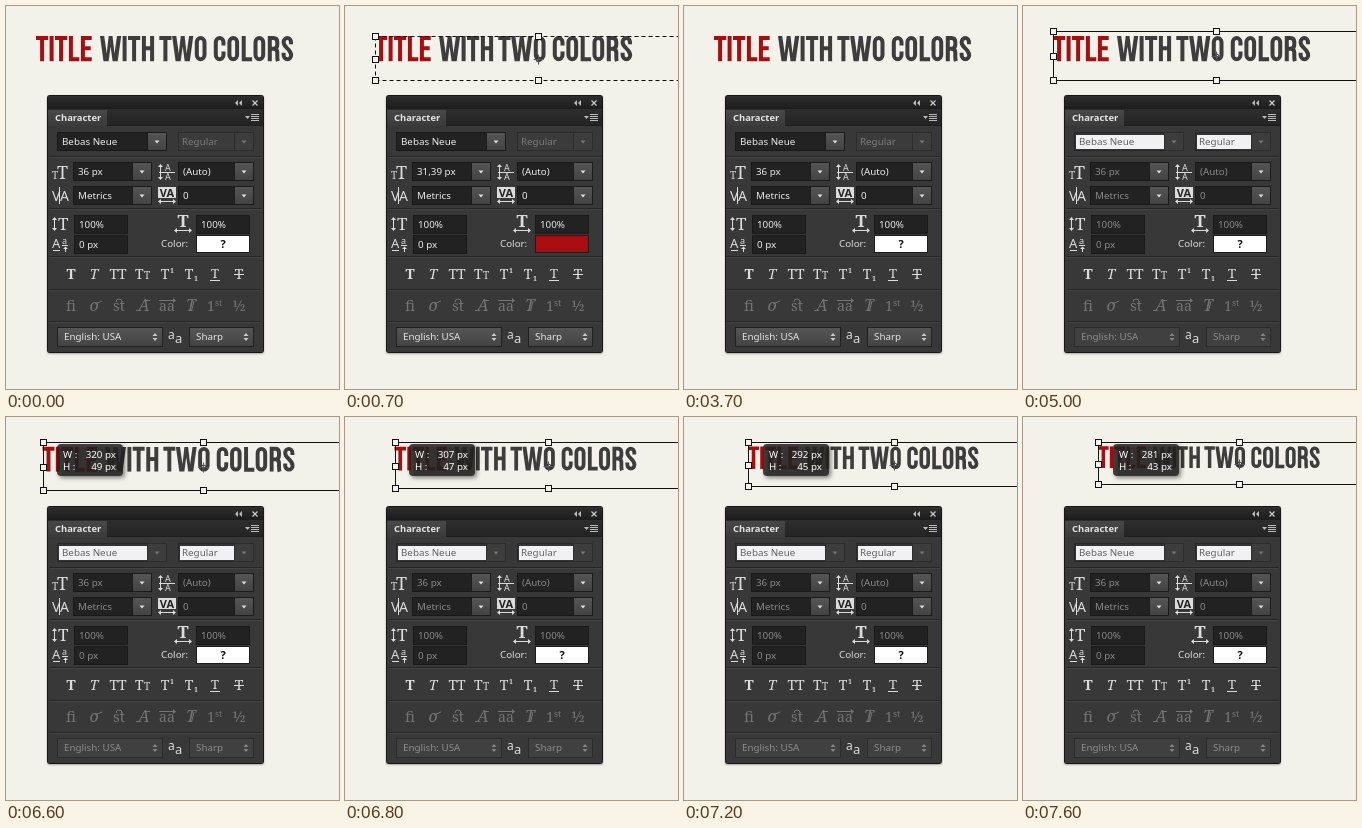
Animation, 333 px wide and 383 px high, one loop 8000 ms. Source, as an HTML page with a canvas:

```html
<!DOCTYPE html>
<html lang="en">
<head>
<meta charset="utf-8">
<title>Title with two colors</title>
<style>
  html, body { margin: 0; width: 100%; height: 100%; overflow: hidden; background: #f2f1ea; }
  canvas { display: block; }
</style>
</head>
<body>
<canvas id="stage" width="333" height="383" role="img" aria-label="TITLE WITH TWO COLORS, above a Character panel"></canvas>
<script>
const W = 333, H = 383, LOOP = 8000;
const RED = '#a80d10', GREY = '#3d3d3d', LIGHT = '#dcdcdc', DIM = '#7c7c7c';
const SANS = '"Noto Sans", "Open Sans", sans-serif';
const SERIF = '"Noto Serif", "Liberation Serif", serif';
const UI = '500 9.8px ' + SANS;

const main = document.getElementById('stage').getContext('2d');
const buffer = document.createElement('canvas');
buffer.width = W;
buffer.height = H;
const layer = buffer.getContext('2d');
let c = main;

// Condensed capitals, 25.2 units high: advance and path
const glyphs = {
  T: [12.8, 'M.3 1.9H12.5M6.4 0V25.2'],
  I: [6.2, 'M3.1 0V25.2'],
  L: [12, 'M3.4 0V23.3H11.8'],
  E: [13.4, 'M12.2 1.9H3.4V23.3H12.2M3.4 12.3H11.2'],
  W: [21.8, 'M.3 0H4.5L7 17.6 9 0H12.8L14.8 17.6 17.3 0H21.5L18 25.2H12.9L10.9 10.5 8.9 25.2H3.8Z'],
  H: [15, 'M3.4 0V25.2M11.6 0V25.2M3.4 12.3H11.6'],
  O: [14.1, 'M3.2 6.2a3.85 4.2 0 0 1 7.7 0V19a3.85 4.2 0 0 1-7.7 0Z'],
  C: [13.6, 'M10.9 9.4V6.2a3.85 4.2 0 0 0-7.7 0V19a3.85 4.2 0 0 0 7.7 0V15.6'],
  R: [14.3, 'M3.4 25.2V1.9H7Q10.9 1.9 10.9 6V8.8Q10.9 12.7 7 12.7H3.4M7.4 12.7Q10.9 13 10.9 16.5V21Q10.9 23.5 11.5 25.2'],
  S: [13.4, 'M10.3 8.2V6.2a3.7 4.2 0 0 0-7.4 0Q2.9 9 6.6 12.4T10.5 19a3.8 4.2 0 0 1-7.6 0V16.8']
};
for (const k in glyphs) glyphs[k][1] = new Path2D(glyphs[k][1]);

function word(s, x, color) {
  c.fillStyle = c.strokeStyle = color;
  c.lineWidth = 4;
  for (const ch of s) {
    const [advance, path] = glyphs[ch];
    c.save();
    c.translate(x, 30);
    ch === 'W' ? c.fill(path) : c.stroke(path);
    c.restore();
    x += advance;
  }
}

function text(s, x, y, color = LIGHT, font = UI, align = 'left') {
  c.font = font;
  c.fillStyle = color;
  c.textAlign = align;
  c.fillText(s, x, y);
}

function rect(x, y, w, h, color) {
  c.fillStyle = color;
  c.fillRect(x, y, w, h);
}

function frame(x, y, w, h, fill, edge) {
  rect(x, y, w, h, edge);
  rect(x + 1, y + 1, w - 2, h - 2, fill);
}

function poly(color, ...p) {
  c.fillStyle = color;
  c.beginPath();
  for (let i = 0; i < p.length; i += 2) c.lineTo(p[i], p[i + 1]);
  c.fill();
}

function line(x1, y1, x2, y2, color = LIGHT, width = 1) {
  c.strokeStyle = color;
  c.lineWidth = width;
  c.beginPath();
  c.moveTo(x1, y1);
  c.lineTo(x2, y2);
  c.stroke();
}

// Arrow with a head at both ends
function arrow(x1, y1, x2, y2) {
  line(x1, y1, x2, y2);
  for (const [x, y, d] of [[x1, y1, -1], [x2, y2, 1]]) {
    if (x1 === x2) poly(LIGHT, x - 2.5, y - d * 2, x + 2.5, y - d * 2, x, y + d);
    else poly(LIGHT, x - d * 2, y - 2.5, x - d * 2, y + 2.5, x + d, y);
  }
}

function gradient(y, h, top, bottom) {
  const g = c.createLinearGradient(0, y, 0, y + h);
  g.addColorStop(0, top);
  g.addColorStop(1, bottom);
  return g;
}

function field(s, x, y, w, dim) {
  frame(x, y, w, 19, '#222', '#191919');
  text(s, x + 5, y + 13, dim ? '#8a8a8a' : '#ececec');
}

function dropButton(x, y, off) {
  frame(x, y, 20, 19, off ? '#3d3d3d' : gradient(y, 19, '#565656', '#424242'), off ? '#2d2d2d' : '#1b1b1b');
  poly(off ? '#777' : '#ddd', x + 7.5, y + 8.5, x + 12.5, y + 8.5, x + 10, y + 11.5);
}

function combo(s, x, y, w, dim) {
  field(s, x, y, w, dim);
  dropButton(x + w - 1, y);
}

function select(s, x, w, dim) {
  const mark = dim ? '#858585' : '#c8c8c8', m = x + w - 8;
  frame(x, 321, w, 20, dim ? '#404040' : gradient(321, 20, '#565656', '#434343'), dim ? '#2c2c2c' : '#202020');
  text(s, x + 7, 334, dim ? '#8c8c8c' : '#e6e6e6');
  poly(mark, m - 2.5, 330, m + 2.5, 330, m, 327);
  poly(mark, m - 2.5, 332, m + 2.5, 332, m, 335);
}

function divider(y) {
  rect(43, y, 213, 1, '#262626');
  rect(43, y + 1, 213, 1, '#444');
}

function icons() {
  const serif = (n, w = '500') => `${w} ${n}px ${SERIF}`;
  text('T', 46, 173, LIGHT, serif(10));
  text('T', 51, 173, LIGHT, serif(18));
  arrow(154.5, 159, 154.5, 173);
  text('A', 159, 165, LIGHT, '500 9px ' + SANS);
  text('A', 159, 174, LIGHT, '500 9px ' + SANS);
  line(153, 166.5, 169, 166.5);

  text('V', 46, 195, LIGHT, '500 14px ' + SANS);
  text('A', 54, 195, LIGHT, '500 14px ' + SANS);
  line(53.5, 181, 53.5, 198);
  rect(152, 181, 18, 11, LIGHT);
  text('VA', 161, 191, '#222', 'bold 11px ' + SANS, 'center');
  arrow(153, 195.5, 169, 195.5);

  arrow(48.5, 212, 48.5, 224);
  text('T', 52, 224, LIGHT, serif(17));
  text('T', 177, 221, LIGHT, serif(17, 'bold'), 'center');
  arrow(169, 224.5, 185, 224.5);
  text('A', 46, 242, LIGHT, '500 13px ' + SANS);
  text('a', 56, 238, LIGHT, '500 9px ' + SANS);
  line(47, 244.5, 54, 244.5);
  line(56, 239.5, 62, 239.5);
  line(59.5, 241, 59.5, 246);
  poly(LIGHT, 57, 243, 62, 243, 59.5, 240.5);

  text('T', 65, 273, LIGHT, serif(14, 'bold'), 'center');
  text('T', 88, 273, LIGHT, serif(14, 'italic'), 'center');
  text('TT', 112, 273, LIGHT, serif(14), 'center');
  text('T', 129, 273, LIGHT, serif(14));
  text('T', 138, 273, LIGHT, serif(10));
  text('T', 159, 273, LIGHT, serif(14), 'center');
  text('1', 164, 267, LIGHT, serif(7, 'bold'));
  text('T', 183, 273, LIGHT, serif(14), 'center');
  text('1', 188, 275, LIGHT, serif(7, 'bold'));
  text('T', 209, 272, LIGHT, serif(13), 'center');
  line(204, 274.5, 214, 274.5);
  text('T', 233, 273, LIGHT, serif(14), 'center');
  line(228, 268.5, 238, 268.5);

  const off = '#747474', plain = serif(15), slant = serif(16, 'italic');
  text('fi', 65, 305, off, plain, 'center');
  text('o', 88, 305, off, slant, 'center');
  line(89, 298, 96, 295, off);
  text('st', 113, 305, off, plain, 'center');
  c.beginPath();
  c.arc(113, 296, 3, Math.PI, 0);
  c.stroke();
  text('A', 138, 305, off, slant, 'center');
  line(130, 304.5, 134, 304.5, off);
  line(138, 294.5, 144, 294.5, off);
  text('aa', 161, 305, off, serif(14), 'center');
  line(153, 294.5, 168, 294.5, off);
  poly(off, 167, 292, 170, 294.5, 167, 297);
  text('T', 185, 305, off, slant, 'center');
  line(185.5, 305, 188, 295, off);
  text('1', 201, 305, off, serif(14));
  text('st', 209, 300, off, serif(9));
  text('½', 233, 305, off, serif(15), 'center');

  text('a', 162, 333, LIGHT, '500 12px ' + SANS);
  text('a', 169, 337, LIGHT, '500 13px ' + SANS);
}

function panel(s) {
  const dim = s.left !== undefined;
  c.save();
  c.shadowColor = 'rgba(0,0,0,.3)';
  c.shadowBlur = 2;
  c.shadowOffsetY = 1;
  c.fillStyle = '#171717';
  c.beginPath();
  c.roundRect(41, 89, 217, 258, 3);
  c.fill();
  c.restore();

  rect(42, 90, 215, 13, gradient(90, 13, '#2e2e2e', '#1c1c1c'));
  rect(42, 103, 215, 17, gradient(103, 17, '#2d2d2d', '#242424'));
  rect(42, 104, 59, 17, gradient(104, 17, '#484848', '#3a3a3a'));
  rect(42, 120, 215, 226, '#383838');
  rect(101, 119, 156, 1, '#1e1e1e');
  text('Character', 49, 115, '#e4e4e4', '600 9.4px ' + SANS);
  poly('#bbb', 232, 94, 232, 100, 229, 97);
  poly('#bbb', 236, 94, 236, 100, 233, 97);
  line(246.5, 94.5, 251.5, 99.5, '#c8c8c8', 1.3);
  line(251.5, 94.5, 246.5, 99.5, '#c8c8c8', 1.3);
  poly('#bbb', 239, 110, 244, 110, 241.5, 113);
  for (let i = 0; i < 4; i++) rect(245, 108 + 2 * i, 8, 1, '#bbb');

  if (dim) {
    frame(51, 126, 91, 19, '#333', '#282828');
    rect(53, 129, 88, 14, '#f1f0f3');
    frame(172, 126, 57, 19, '#333', '#282828');
    rect(174, 129, 54, 14, '#f1f0f3');
    text('Bebas Neue', 56, 139, '#626262');
    text('Regular', 176, 139, '#626262');
  } else {
    field('Bebas Neue', 51, 126, 91);
    frame(172, 126, 57, 19, '#3b3b3b', '#2c2c2c');
    text('Regular', 176, 139, DIM);
  }
  dropButton(141, 126, dim);
  dropButton(228, 126, true);

  [150, 202, 250, 283, 315].forEach(divider);
  combo(s.ink ? '31,39 px' : '36 px', 67, 156, 60, dim);
  combo('(Auto)', 172, 156, 57, dim);
  combo('Metrics', 67, 180, 60, dim);
  combo('0', 172, 180, 57, dim);
  field('100%', 68, 209, 54, dim);
  field('100%', 190, 209, 54, dim);
  field('0 px', 68, 229, 54, dim);
  text('Color:', 155, 241);
  frame(190, 229, 54, 18, s.ink || '#fff', '#1c1c1c');
  if (!s.ink) text('?', 217, 242, '#111', 'bold 11px ' + SANS, 'center');

  icons();
  select('English: USA', 51, 106, dim);
  select('Sharp', 183, 65, dim);
}

const RIGHT = 356.5, TOP = 25.5, FULL = 326;

function handles(x, top, bottom, dashed) {
  const mid = Math.floor((x + RIGHT) / 2) + .5, cy = Math.round((top + bottom) / 2) + .5;
  c.setLineDash(dashed ? [4, 3] : []);
  line(x, top, RIGHT, top, '#111');
  line(x, bottom, RIGHT, bottom, '#111');
  line(x, top, x, bottom, '#111');
  c.setLineDash([]);
  for (const [hx, hy] of [[x, top], [mid, top], [x, cy], [x, bottom], [mid, bottom]]) {
    frame(hx - 3.5, hy - 3.5, 7, 7, '#f4f3ee', '#111');
  }
  c.strokeStyle = '#333';
  c.beginPath();
  c.arc(mid, cy, 2.5, 0, 7);
  c.stroke();
  line(mid - 5, cy, mid + 5, cy, '#555');
  line(mid, cy - 5, mid, cy + 5, '#555');
}

function tooltip(left, scale) {
  const x = Math.round(left + 14);
  c.save();
  c.shadowColor = 'rgba(0,0,0,.55)';
  c.shadowBlur = 4;
  c.shadowOffsetX = c.shadowOffsetY = 2;
  c.fillStyle = 'rgba(38,36,36,.84)';
  c.beginPath();
  c.roundRect(x, 27, 66, 32, 4);
  c.fill();
  c.restore();
  [['W :', FULL * scale], ['H :', 50 * scale]].forEach(([label, n], i) => {
    const y = 41 + 12 * i;
    text(label, x + 6, y, '#fff');
    text(Math.round(n) + ' px', x + 59, y, '#fff', UI, 'right');
  });
}

function scene(ctx, s) {
  c = ctx;
  rect(0, 0, W, H, '#f2f1ea');
  const left = s.left ?? 30.5, scale = (RIGHT - left) / FULL;
  c.save();
  c.translate(RIGHT, TOP);
  c.scale(scale, scale);
  c.translate(-RIGHT, -TOP);
  word('TITLE', 29.7, RED);
  word('WITH', 93.7, GREY);
  word('TWO', 153, GREY);
  word('COLORS', 206.6, GREY);
  c.restore();
  panel(s);
  if (s.ink) handles(30.5, 30.5, 74.5, true);
  if (s.caret) rect(s.caret, 24, 1, 38, '#111');
  if (s.left !== undefined) {
    handles(Math.floor(left) + .5, TOP, Math.floor(TOP + 49 * scale) + .5);
    if (s.drag) tooltip(left, scale);
  }
}

// Left edge of the box while it is dragged smaller
function dragLeft(t) {
  const keys = [[6500, 30.5], [6800, 50], [7200, 64.5], [7600, 75.5]];
  if (t >= 7600) return 75.5;
  const i = keys.findIndex(k => t < k[0]);
  const [t0, x0] = keys[i - 1], [t1, x1] = keys[i];
  return x0 + (x1 - x0) * (t - t0) / (t1 - t0);
}

// Start time, state, number of 100 ms blending steps
const cues = [
  [0, {}, 1],
  [500, { ink: RED }, 3],
  [1400, { ink: RED, caret: 49 }, 1],
  [1900, { ink: GREY }, 3],
  [2900, { ink: GREY, caret: 166 }, 1],
  [3600, {}, 2],
  [5000, { left: 30.5 }, 1]
];

function draw(t) {
  if (t >= 6600) {
    const step = Math.floor(t / 100) * 100;
    return scene(main, { left: dragLeft(step), drag: true });
  }
  let i = cues.length - 1;
  while (cues[i][0] > t) i--;
  const [start, state, steps] = cues[i];
  const mix = Math.min(1, (Math.floor((t - start) / 100) + 1) / steps);
  if (mix === 1) return scene(main, state);
  scene(main, cues[i - 1][1]);
  scene(layer, state);
  main.globalAlpha = mix;
  main.drawImage(buffer, 0, 0);
  main.globalAlpha = 1;
}

const begin = performance.now();
function tick() {
  draw((performance.now() - begin) % LOOP);
  requestAnimationFrame(tick);
}
tick();
</script>
</body>
</html>
```
